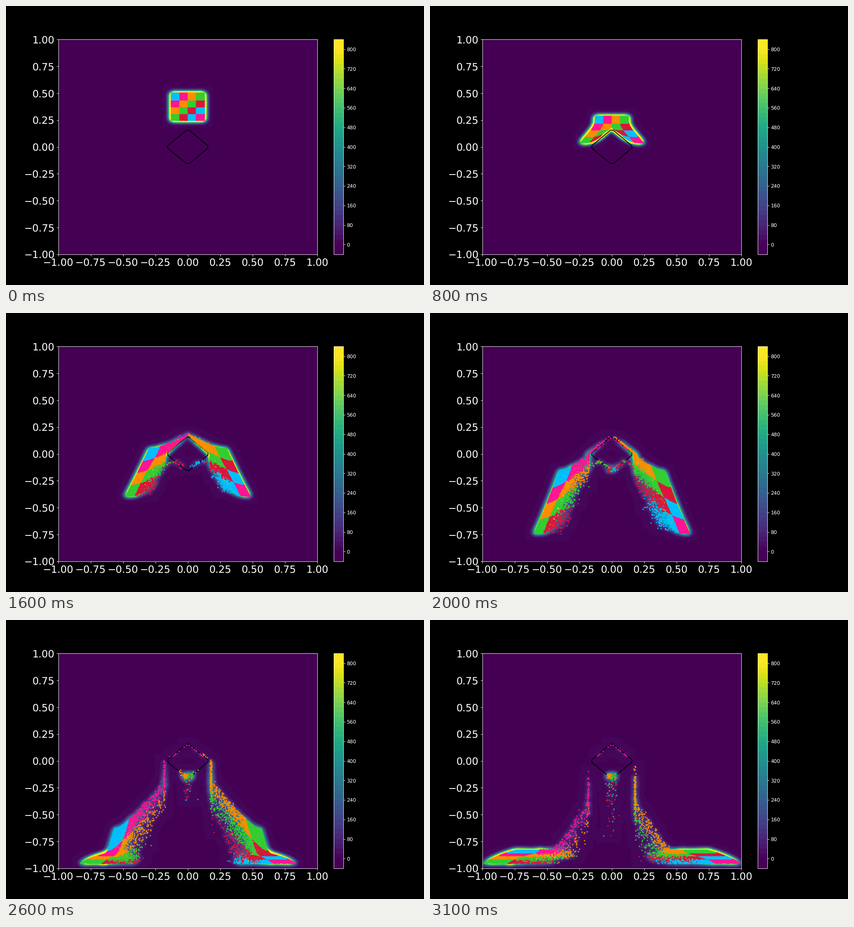
A matplotlib script that plays this animation: 917 px wide and 611 px high, repeating every 3.2 s.

```python
import numpy as np
import matplotlib.pyplot as plt
from matplotlib.animation import FuncAnimation

W, H = 917, 611
SCALE = 0.79             # size of one layout point
FRAMES, STEP = 32, 100
GRAVITY, SPEED = 0.55, 0.05
FLOOR = -0.962
SIDE = 96                # particles per edge of the block
COLORS = np.array(["deepskyblue", "deeppink", "darkorange",
                   "limegreen", "crimson"])

plt.rcParams.update({
    "font.family": "DejaVu Sans",
    "text.hinting": "none",
    "text.color": "white",
    "axes.edgecolor": "white",
    "axes.linewidth": 0.8 * SCALE,
    "xtick.color": "white",
    "ytick.color": "white",
})


def ramp(x, soft):
    """max(x, 0) with a rounded corner."""
    return soft * np.logaddexp(0, x / soft)


def ease(x):
    x = np.clip(x, 0, 1)
    return x * x * (3 - 2 * x)


# Particles, bottom row first so that upper layers are painted last.
# u runs left to right, v top to bottom, across from the rim to the centre.
rng = np.random.default_rng(4)
N = SIDE * SIDE
gy, gx = np.divmod(np.arange(N), SIDE)
u = (gx + rng.random(N)) / SIDE
v = (SIDE - 1 - gy + rng.random(N)) / SIDE
tone = COLORS[((4 * u).astype(int) + (4 * v).astype(int)) % 5]
right = u >= 0.5
sign = np.where(right, 1, -1)
across = 1 - np.abs(2 * u - 1)
inner = np.clip(2 * across - 1, 0, 1)

# The right half is held back in a thicker layer than the left one
knee = np.where(right, 0.55, 0.4)
crowd = np.where(right, 0.3, 0.8)
spread = 0.008 + 0.014 * np.sqrt(v)
noise = np.clip(rng.standard_t(3, (2, N)), -4, 4)
r1, r2, r3, r4 = rng.random((4, N))

stay = ~right & (v < 0.25) & (inner > 0.98)
escape = (v > 0.25) & (inner > 0.55) & (rng.random(N) < 0.12)
leave = np.where(stay, 1.7, 1 + 1.3 * (1 - v) + 0.3 * r4)
drips = r3 < 0.25


def flow(t):
    """Free fall, deflection by the obstacle, flight and landing."""
    k = np.clip((t - 0.8) / 1.2, 0, 1)
    a = np.where(across > 0.5, 0.5 + 0.5 * inner ** (1 + k * crowd), across)
    core = a**3
    hold = core / (1 + (v / knee)**4)

    # Sideways push begins at the bottom, braking a little later
    push = ramp(t - 0.97 + 0.55 * v, 0.03)
    brake = ramp(t - 0.97 + 0.2 * v + 0.35 * core * v**2, 0.03)
    vx = (0.27 + 0.03 * v) * (1 - 0.2 * core - 0.8 * hold)
    lift = (0.53 - 0.46 * v + 0.1 * v**2
            + 0.2 * a * v * (1 - v) + 0.08 * hold)
    x = 0.127 * (1 - a) + vx * push
    y = (0.5 - 0.252 * v - SPEED * t - GRAVITY * t * t / 2
         + lift * brake + 0.21 * hold * brake**2)

    # Pile up on the floor and spread along it
    depth = np.maximum(FLOOR - y, 0)
    x = x + (0.06 - 0.2 * a) * (1 - np.exp(-depth / 0.25))
    pile = FLOOR + 0.13 * (1 - v)**0.7
    y = pile + ramp(y - pile, 0.02)

    x = x + k * spread * inner * noise[0]
    y = y + k * spread * inner * noise[1]
    return np.maximum(x, 0.172 + 0.015 * r2 - np.maximum(y, 0)), y


def creep(t):
    """Slide below the obstacle and drip, or stick to its top."""
    s = np.clip((t - leave) / 0.6, 0, 1)
    fall = 0.3 * np.clip(t - leave - 0.6 - 0.3 * r4, 0, None)**2 * drips
    x = 0.165 * (1 - s) + 0.035 * r1 * s + 0.08 * noise[0] * fall
    y = -(0.12 + 0.05 * r2) * s - fall
    edge = 0.24 * r1 - 0.12
    return (np.where(stay, edge, x),
            np.where(stay, 0.158 - np.abs(edge), y))


def place(t):
    x, y = flow(t)
    px, py = creep(t)
    b = ease((t - leave) / 0.3) * (stay | escape)
    x, y = x + (px - x) * b, y + (py - y) * b
    return x * sign, np.maximum(y, -0.945 - 0.012 * r3)


# Density on a grid
CELLS = 160
axis = np.linspace(-1, 1, CELLS + 1)
edges = np.linspace(-1 - 1 / CELLS, 1 + 1 / CELLS, CELLS + 2)
gap = np.abs(axis[:, None] - axis) / 0.018
blur = np.where(gap < 3, np.exp(-gap**2 / 2), 0)
blur /= blur[CELLS // 2].sum()
GAIN = 157
LEVELS = np.arange(-40, 841, 20)


def density(x, y):
    count = np.histogram2d(y, x, bins=(edges, edges))[0]
    return np.minimum(GAIN * blur @ count @ blur.T, 839)


fig = plt.figure(figsize=(W / 100, H / 100), dpi=100, facecolor="black")
ax = fig.add_axes([0.125, 0.11, 0.62, 0.77])
cax = fig.add_axes([0.78375, 0.11, 21 / W, 0.77])


def contours(x, y):
    return ax.contourf(axis, axis, density(x, y), levels=LEVELS,
                       cmap="viridis", vmin=0, vmax=800, zorder=0)


x0, y0 = place(0)
field = contours(x0, y0)
fig.colorbar(field, cax=cax, ticks=np.arange(0, 801, 80))
dots = ax.scatter(x0, y0, s=4.5, c=tone, linewidths=0, zorder=2)

# Obstacle: a diamond with clipped tips
tip, cut = 0.155, 0.011
corner = np.array([[-cut, tip], [cut, tip], [tip, cut], [tip, -cut]])
ax.add_patch(plt.Polygon(np.vstack([corner, -corner]), fill=False,
                         edgecolor="black", lw=1.5 * SCALE, zorder=1))

ax.set(xlim=(-1, 1), ylim=(-1, 1),
       xticks=np.linspace(-1, 1, 9), yticks=np.linspace(-1, 1, 9))
for a, size in ((ax, 20), (cax, 10)):
    a.tick_params(labelsize=size * SCALE, length=3.5 * SCALE,
                  width=0.8 * SCALE, pad=3.5 * SCALE)


def update(n):
    global field
    x, y = place(n * STEP / 1000)
    field.remove()
    field = contours(x, y)
    dots.set_offsets(np.column_stack([x, y]))
    return [dots]


anim = FuncAnimation(fig, update, frames=FRAMES, interval=STEP,
                     repeat=True, repeat_delay=0, blit=False)
plt.show()
```
